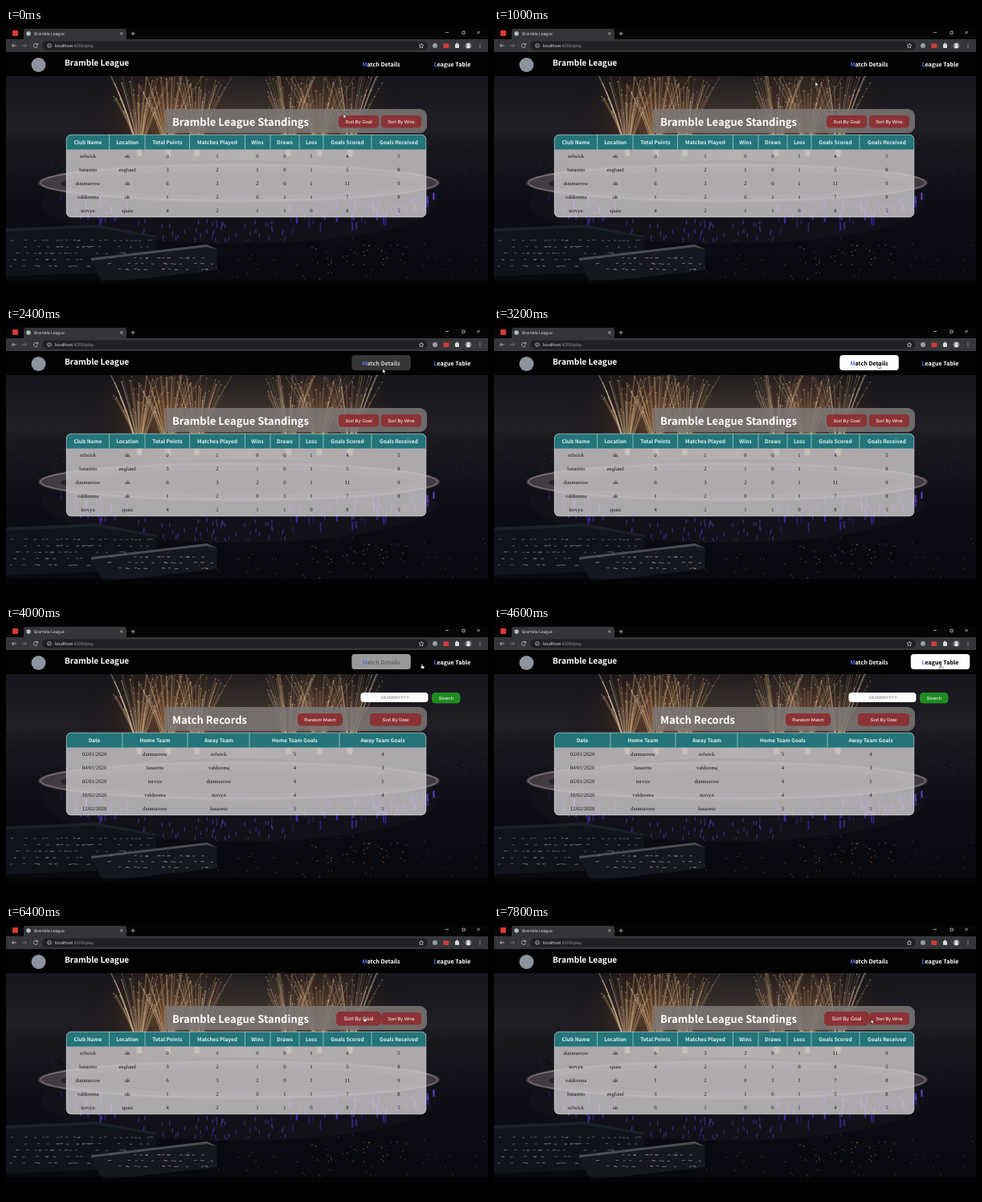
Recreate the animation shown at these times as an HTML page with a canvas. Size 600 by 338 pixels, loop 8 s.

```html
<!DOCTYPE html>
<html lang="en">
<head>
<meta charset="utf-8">
<title>Bramble League</title>
<style>
  html, body { margin: 0; width: 100%; height: 100%; overflow: hidden; background: #000; }
  canvas, svg { position: absolute; left: 0; top: 0; width: 100%; height: 100%; display: block; }
  text { text-anchor: middle; text-rendering: geometricPrecision; white-space: pre; }
  .head { font-family: "Noto Sans CJK JP", "Noto Sans CJK SC", "Noto Sans CJK", sans-serif; font-weight: 700; }
  .cell { font-family: "Liberation Serif", serif; fill: #161417; }
  .ui { font-family: "Liberation Sans", sans-serif; }
  .chrome { font-family: "Open Sans", sans-serif; }
  .left { text-anchor: start; }
  .icon { fill: none; stroke: #c4c7ca; stroke-width: .8; }
</style>
</head>
<body>
<canvas id="photo" width="600" height="338"></canvas>
<svg id="stage" viewBox="0 0 600 338"></svg>
<script>
const LOOP = 8000;
const NAME = 'Bramble League';

// ---- Night photo of a stadium with fireworks ----
const ctx = document.getElementById('photo').getContext('2d');
let seed = 11;
const random = () => (seed = seed * 16807 % 2147483647) / 2147483647;
const between = (a, b) => a + (b - a) * random();

function fill(color, draw) {
  ctx.fillStyle = color;
  ctx.beginPath();
  draw();
  ctx.fill();
}
const ellipse = (x, y, rx, ry) => () => ctx.ellipse(x, y, rx, ry, 0, 0, 7);
const polygon = (...points) => () => points.forEach(([x, y]) => ctx.lineTo(x, y));

function glow(x, y, radius, color) {
  const gradient = ctx.createRadialGradient(x, y, 0, x, y, radius);
  gradient.addColorStop(0, color);
  gradient.addColorStop(1, 'transparent');
  ctx.fillStyle = gradient;
  ctx.fillRect(0, 60, 600, 200);
}

function specks(count, color, x0, x1, y0, y1, w, h) {
  ctx.fillStyle = color;
  for (let i = 0; i < count; i++) ctx.fillRect(between(x0, x1), between(y0, y1), w, h);
}

function fountain(x) {
  for (let i = 0; i < 48; i++) {
    const angle = between(-.42, .42), reach = between(50, 112);
    const endX = x + Math.sin(angle) * reach, endY = 160 - Math.cos(angle) * reach;
    ctx.strokeStyle = `rgba(${i % 3 ? '236,190,134' : '255,232,200'},${between(.12, .5)})`;
    ctx.lineWidth = between(.4, 1.3);
    ctx.beginPath();
    ctx.moveTo(x + between(-3, 3), 160);
    ctx.quadraticCurveTo(x + (endX - x) * .35, 160 - reach * .5, endX, endY);
    ctx.stroke();
    fill('rgba(255,226,190,.55)', ellipse(endX, endY, .7, .7));
  }
}

function drawPhoto() {
  const sky = ctx.createLinearGradient(0, 60, 0, 321);
  [[0, '#15161d'], [.25, '#211e25'], [.32, '#19181f'], [.6, '#0d0e16'], [1, '#08090f']]
    .forEach(stop => sky.addColorStop(...stop));
  ctx.fillStyle = sky;
  ctx.fillRect(0, 60, 600, 261);
  specks(130, '#57483e', 0, 600, 128, 190, 1, .7);

  glow(200, 110, 110, 'rgba(160,98,52,.6)');
  glow(395, 110, 110, 'rgba(150,96,58,.55)');
  [166, 202, 238, 352, 390, 428].forEach(fountain);
  glow(300, 165, 190, 'rgba(214,166,120,.4)');

  fill('#12111a', ellipse(290, 217, 246, 52));
  fill('#413b42', ellipse(290, 193, 250, 25));
  ctx.strokeStyle = '#81777d';
  ctx.lineWidth = 1.2;
  ctx.beginPath();
  ctx.ellipse(290, 193, 247, 22, 0, 0, 7);
  ctx.stroke();
  fill('#262128', ellipse(290, 194, 222, 15));

  for (let i = 0; i < 100; i++) {
    const x = i < 28 ? between(68, 150) : between(350, 533);
    const bend = Math.sqrt(Math.max(0, 1 - ((x - 290) / 250) ** 2));
    ctx.fillStyle = `rgba(${i % 4 ? '72,44,190' : '112,76,236'},${between(.3, .9)})`;
    ctx.fillRect(x, 203 + bend * between(8, 48), between(1, 2.6), between(5, 12));
  }
  specks(50, '#3a2a7a', 150, 350, 238, 262, 1.3, 5);

  fill('#11141c', polygon([0, 252], [112, 246], [187, 261], [187, 302], [0, 310]));
  fill('#1c2029', polygon([0, 250], [112, 245], [187, 259], [187, 262], [112, 249], [0, 254]));
  for (let row = 0; row < 5; row++) specks(22, '#70675f', 2, 180, 264 + row * 8, 265 + row * 8, 3.2, .8);
  fill('#151820', polygon([106, 287], [250, 270], [263, 276], [263, 302], [120, 318]));
  fill('#4c4c52', polygon([106, 287], [250, 270], [263, 276], [250, 273], [106, 290]));
  for (let row = 0; row < 3; row++) specks(16, '#8d8177', 125, 255, 286 + row * 7, 287 + row * 7, 3, .8);
  specks(75, '#6f4c35', 190, 598, 262, 316, 1.3, .8);
  specks(24, '#8c5638', 380, 500, 270, 295, 1.5, 1);
  fill('rgba(0,0,0,.55)', polygon([0, 314], [600, 314], [600, 321], [0, 321]));
}

// ---- Browser window and page ----
const text = (x, y, size, content, cls, color = '') =>
  `<text x="${x}" y="${y}" font-size="${size}" class="${cls}"${color && ` fill="${color}"`}>${content}</text>`;
const box = (x, y, w, h, r, color, extra = '') =>
  `<rect x="${x}" y="${y}" width="${w}" height="${h}" rx="${r}" fill="${color}" ${extra}/>`;
const circle = (x, y, r, color) => `<circle cx="${x}" cy="${y}" r="${r}" fill="${color}"/>`;
const icon = d => `<path class="icon" d="${d}"/>`;
const button = (x, y, w, h, label, color) =>
  box(x, y, w, h, 4.5, color) + text(x + w / 2, y + h / 2 + 2, 5.8, label, 'ui', '#fff');
const redButton = (x, w, label) => button(x, 109, w, 15.5, label, '#8b3235');

const browser = () =>
  box(0, 0, 600, 14, 0, '#050505') + box(8, 3, 7, 7, 1, '#d83a36') +
  box(22, 1, 128, 16, 3, '#35363a') + box(0, 14, 600, 16, 0, '#35363a') +
  circle(28, 7, 2.7, '#b9bcc0') +
  text(35, 9, 5, NAME, 'chrome left', '#e6e7e9') +
  icon('M142 5.2l3.4 3.4m0-3.4l-3.4 3.4M155.500 7h5m-2.500-2.500v5M547 5.500h4M568 4.200h3.200v3.200h-3.200zM586.500 3.800l3.400 3.400m0-3.400l-3.400 3.400') +
  icon('M13 22H7.500m2.300-2.300L7.500 22l2.300 2.300') +
  `<g opacity=".45">${icon('M20 22h5.500m-2.300-2.300L25.500 22l-2.300 2.300')}</g>` +
  icon('M39 20.500a2.500 2.500 0 1 0 .4 2.200M39.400 19v2h-2') +
  box(45, 16.500, 480, 11, 5.500, '#202124') +
  icon('M56.300 22a2.300 2.300 0 1 1-4.600 0a2.300 2.300 0 1 1 4.600 0M54 21.700v1.500') +
  text(61, 24, 5.300, 'localhost<tspan fill="#9b9ea3">:4200/play</tspan>', 'chrome left', '#f0f0f0') +
  icon('M517 19.300l.9 1.900l2 .2l-1.500 1.400l.4 2l-1.800-1l-1.800 1l.4-2l-1.500-1.400l2-.2z') +
  circle(534, 22, 3, '#9a9da1') + box(544.500, 19.500, 7, 5.500, 1, '#d33b38') +
  box(559, 20, 5, 5, .8, '#d5d7d9') + circle(561.500, 19.800, 1.200, '#d5d7d9') +
  circle(575.500, 22, 3.800, '#8b8d91') + circle(575.500, 20.700, 1.500, '#eee') +
  box(573.500, 22.300, 4, 2.800, 1.300, '#eee') +
  [20, 22, 24].map(y => circle(590, y, .6, '#ccc')).join('');

const navLink = (id, x, first, rest, center) =>
  `<g id="${id}">${box(x, 35, 73.500, 19, 4, '#fff')}${
    text(center, 48, 7.150, `<tspan fill="#5870ee">${first}</tspan>${rest}`, 'head')}</g>`;

const titleBar = title =>
  '<path d="M198 101H515a9 9 0 0 1 9 9v12a9 9 0 0 1-9 9H198z" fill="#7d7776" fill-opacity=".86"/>' +
  text(207, 121.500, 13, title, 'head left', '#fff');

const tableFrame = (columns, dividers) =>
  box(75, 133, 448, 103, 6, '#c9c5c7', 'fill-opacity=".84"') +
  '<path d="M75 151.500V139a6 6 0 0 1 6-6H517a6 6 0 0 1 6 6v12.500z" fill="#23757a"/>' +
  `<path d="${dividers.map(x => `M${x} 133v18.500`).join('')}" stroke="#a9c9ca" stroke-width=".8"/>` +
  box(75.200, 133.200, 447.600, 102.600, 6, 'none', 'stroke="#d8d8d8" stroke-width=".6"') +
  columns.map(([label, x]) => text(x, 145, 6.500, label, 'head', '#e3efef')).join('');

const tableRows = (rows, columns) => rows.map((row, r) =>
  row.split(' ').map((value, c) => text(columns[c][1], 162 + r * 16.900, 6.700, value, 'cell')).join('')).join('');

const leagueColumns = [['Club Name', 102], ['Location', 151], ['Total Points', 201], ['Matches Played', 263],
  ['Wins', 313], ['Draws', 347], ['Loss', 380], ['Goals Scored', 425], ['Goals Received', 489]];
const matchColumns = [['Date', 110], ['Home Team', 185.500], ['Away Team', 265],
  ['Home Team Goals', 359.500], ['Away Team Goals', 469]];

const clubs = [
  'orlwick uk 0 1 0 0 1 4 5',
  'lunareto england 3 2 1 0 1 5 8',
  'dunmarrow uk 6 3 2 0 1 11 9',
  'valdorena uk 1 2 0 1 1 7 8',
  'torvyn spain 4 2 1 1 0 8 5'
];
const goals = row => +row.split(' ')[7];
const clubsByGoals = [...clubs].sort((a, b) => goals(b) - goals(a));
const matches = [
  '02/01/2020 dunmarrow orlwick 5 4',
  '04/01/2020 lunareto valdorena 4 3',
  '05/01/2020 torvyn dunmarrow 4 1',
  '10/02/2020 valdorena torvyn 4 4',
  '12/02/2020 dunmarrow lunareto 5 1'
];

drawPhoto();
const $ = id => document.getElementById(id);
$('stage').innerHTML =
  browser() +
  box(0, 30, 600, 30, 0, '#020203') + circle(40.500, 46, 9, '#8d949f') +
  text(73, 47, 10.100, NAME, 'head left', '#fff') +
  navLink('matchLink', 430.300, 'M', 'atch Details', 467) +
  navLink('leagueLink', 518.800, 'L', 'eague Table', 555.500) +
  `<g id="league">${titleBar(NAME + ' Standings')}${redButton(467, 50, 'Sort By Wins')}
    <g id="goalButton">${redButton(414, 50, 'Sort By Goal')}</g>
    ${tableFrame(leagueColumns, [128.500, 173, 228.500, 297.500, 329, 365, 395, 455])}
    <g id="unsorted">${tableRows(clubs, leagueColumns)}</g>
    <g id="sorted">${tableRows(clubsByGoals, leagueColumns)}</g></g>` +
  `<g id="match">${box(441.500, 83, 84, 12, 4, '#fff')}${text(484.500, 91.200, 5.500, 'DD/MM/YYYY', 'ui', '#777')}
    ${button(530, 83, 35.500, 13.500, 'Search', '#1f8b22')}
    ${titleBar('Match Records')}${redButton(363, 56, 'Random Match')}${redButton(453, 64, 'Sort By Date')}
    ${tableFrame(matchColumns, [145, 226, 303, 415])}${tableRows(matches, matchColumns)}</g>` +
  `<g id="cursor" fill="#fff" stroke="#111" stroke-width=".5">
    <path id="arrow" d="M0 0v5.600l1.300-1.200l.9 2l.9-.4l-.9-1.900h1.700z"/>
    <path id="hand" d="M-.6 .4q.6-.8 1.200 0v2.200l2 .5q.6.200.5.900l-.5 2.200h-2.700l-1.700-2.200q0-.9 1.200-.3z"/></g>`;

// ---- Motion ----
const clamp = v => Math.max(0, Math.min(1, v));
const hover = (t, enter, leave, duration) => clamp((t - enter) / duration) - clamp((t - leave) / duration);
const show = (id, visible) => $(id).setAttribute('visibility', visible ? 'inherit' : 'hidden');

const path = [[0, 420, 107], [200, 419, 105], [1000, 400, 67], [1500, 408, 65], [2200, 464, 54], [2400, 469, 52],
  [3200, 478.500, 45.500], [3700, 479, 46], [4300, 556, 48], [5100, 556, 48], [6100, 447, 113],
  [6400, 446, 114.500], [7300, 447, 115], [7800, 469.500, 117.500], [8000, 472, 118]];

function cursorAt(t) {
  const i = path.findIndex(([time]) => time > t);
  const [t0, x0, y0] = path[i - 1], [t1, x1, y1] = path[i];
  const p = (t - t0) / (t1 - t0), k = p * p * (3 - 2 * p);
  return [x0 + (x1 - x0) * k, y0 + (y1 - y0) * k];
}

function paintLink(id, amount) {
  const [back, label] = $(id).children, shade = Math.round(255 * (1 - amount));
  back.setAttribute('fill-opacity', amount);
  label.setAttribute('fill', `rgb(${shade},${shade},${shade})`);
}

function render(t) {
  const onMatches = t >= 3500 && t < 5100;
  const sorted = t >= 7000;
  show('match', onMatches);
  show('league', !onMatches);
  show('sorted', sorted);
  show('unsorted', !sorted);
  paintLink('matchLink', hover(t, 2300, 3800, 500));
  paintLink('leagueLink', hover(t, 4000, 5300, 500));

  const scale = 1 + .12 * hover(t, 6050, 7900, 250);
  $('goalButton').setAttribute('transform', `translate(439 116.75) scale(${scale}) translate(-439 -116.75)`);

  const [x, y] = cursorAt(t);
  $('cursor').setAttribute('transform', `translate(${x} ${y})`);
  const pointing = (t > 2500 && t < 3800) || (t > 4000 && t < 5250) || (t > 6050 && t < 7600);
  show('hand', pointing);
  show('arrow', !pointing);
}

const start = performance.now();
function frame() {
  render((performance.now() - start) % LOOP);
  requestAnimationFrame(frame);
}
frame();
</script>
</body>
</html>
```
